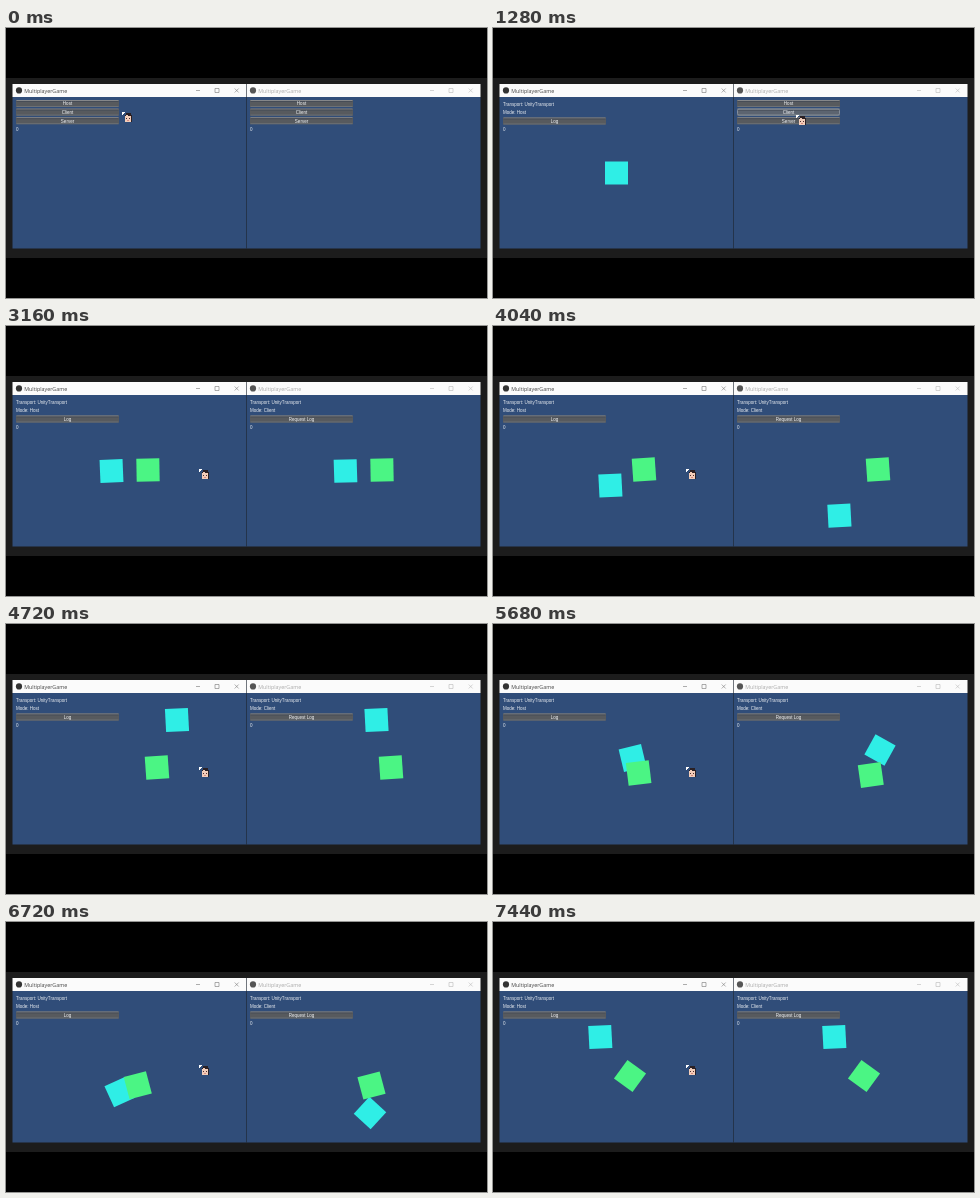
Write an HTML page with a canvas that moves like this. It is 481 by 270 pixels and loops after 7480 ms.

```html
<!DOCTYPE html>
<html lang="en">
<head>
<meta charset="utf-8">
<title>Multiplayer demo</title>
<style>
html, body { margin: 0; width: 100%; height: 100%; overflow: hidden; background: #000; }
canvas { display: block; }
</style>
</head>
<body>
<canvas id="stage" width="481" height="270"></canvas>
<script>
const ctx = document.getElementById('stage').getContext('2d');
const LOOP = 7480, STEP = 40, LAG = 250, GREEN_LAG = 120, SHIFT = 234;
const HOST_AT = 480, FOCUS_RIGHT = 1720, CLIENT_AT = 1900, FOCUS_LEFT = 2880;
const CYAN = '#2feee6', GREEN = '#4bf584', BLUE = '#304d79';

// Waypoints of the steered square: time, x, y
const route = [
  [3260, 105.5, 145], [3500, 128, 145], [3750, 112, 192], [4470, 136.5, 96],
  [4720, 171, 96], [5430, 153, 126], [5680, 139.5, 134], [6080, 163, 162],
  [6470, 130, 191], [6720, 113.7, 170], [7190, 107.3, 115]
];

// Smooth step from 0 to 1 between two times
function ease(t, from, to) {
  const f = Math.min(1, Math.max(0, (t - from) / (to - from)));
  return f * f * (3 - 2 * f);
}

// Cubic Hermite curve through the waypoints, at rest at both ends
function follow(path, t) {
  const last = path.length - 1;
  const time = Math.min(path[last][0], Math.max(path[0][0], t));
  const i = Math.max(1, path.findIndex(p => p[0] >= time));
  const a = path[i - 1], b = path[i], span = b[0] - a[0], f = (time - a[0]) / span;
  const slope = (n, k) => n === 0 || n === last ? 0 :
    (path[n + 1][k] - path[n - 1][k]) / (path[n + 1][0] - path[n - 1][0]);
  return [1, 2].map(k => a[k] + (b[k] - a[k]) * f * f * (3 - 2 * f) +
    span * f * (1 - f) * ((1 - f) * slope(i - 1, k) - f * slope(i, k)));
}

function cyanPose(t) {
  const [x, y] = follow(route, t);
  const angle = -3 * ease(t, CLIENT_AT, 3700) + 32 * ease(t, 5000, 5430) -
    43 * ease(t, 5430, 5680) + 101 * ease(t, 5620, 7190);
  return [x + 18 * (1 - ease(t, CLIENT_AT, 2120)), y, angle];
}

function greenPose(t) {
  const split = ease(t, CLIENT_AT, 2120), push = ease(t, 3300, 3500);
  const drag = ease(t, 4950, 6720), spin = ease(t, 6720, 7200);
  return [
    124 + 18 * split + 9 * push - 19.5 * drag + 5.5 * spin,
    144 - .5 * push + 20 * drag - 9.5 * spin,
    -split - 3 * push - 11 * drag + 51 * spin
  ];
}

function pointerAt(t) {
  const toHost = ease(t, 0, 280), toClient = ease(t, 800, 1280), back = ease(t, 2320, 2800);
  return [
    116 - 12 * toHost + 199 * toClient - 110 * back,
    84 - 7 * toHost + 10 * toClient + 56 * back + 26 * Math.sin(Math.PI * toClient)
  ];
}

function rect(x, y, w, h, color) {
  ctx.fillStyle = color;
  ctx.fillRect(x, y, w, h);
}

function text(str, x, y, color, font = '4.5px "Liberation Sans", sans-serif', align = 'left') {
  ctx.font = font;
  ctx.textAlign = align;
  ctx.fillStyle = color;
  ctx.fillText(str, x, y);
}

function square([x, y, angle], color) {
  ctx.save();
  ctx.translate(x, y);
  ctx.rotate(angle * Math.PI / 180);
  rect(-11.5, -11.5, 23, 23, color);
  ctx.restore();
}

function button(label, y, [px, py]) {
  const hover = px >= 10 && px <= 113 && py >= y && py < y + 8;
  rect(10, y, 103, 7, hover ? '#5c6470' : '#575a5e');
  rect(10.5, y, 102, 1, '#85878a');
  rect(10.5, y + 1, 102, 1, '#464c56');
  rect(10.5, y + 6, 102, 1, '#6d7175');
  if (hover) {
    ctx.strokeStyle = '#8f98a6';
    ctx.lineWidth = .8;
    ctx.beginPath();
    ctx.roundRect(10.5, y + .5, 102, 6, 1.5);
    ctx.stroke();
  }
  text(label, 61.5, y + 5.4, '#f2f4f6', undefined, 'center');
}

function titleBar(active) {
  rect(6.5, 56, 234, 13, '#fbfbfb');
  ctx.fillStyle = active ? '#333' : '#555';
  ctx.beginPath();
  ctx.arc(13, 62.4, 3.1, 0, 7);
  ctx.fill();
  text('MultiplayerGame', 18.2, 64.6, active ? '#444' : '#aaa', '5.35px "Open Sans", sans-serif');
  ctx.strokeStyle = active ? '#777' : '#bbb';
  ctx.lineWidth = .6;
  ctx.beginPath();
  ctx.moveTo(190, 62.5); ctx.lineTo(194, 62.5);
  ctx.rect(209, 60.5, 4, 4);
  ctx.moveTo(228.7, 60.5); ctx.lineTo(232.7, 64.5);
  ctx.moveTo(232.7, 60.5); ctx.lineTo(228.7, 64.5);
  ctx.stroke();
}

function gameWindow(dx, active, mode, action, pointer, squares) {
  ctx.save();
  ctx.translate(dx, 0);
  titleBar(active);
  rect(6.5, 69, 234, 151.5, BLUE);
  if (mode) {
    text('Transport: UnityTransport', 10, 77.6, '#eceff3');
    text('Mode: ' + mode, 10, 86.1, '#eceff3');
    button(action, 89.5, pointer);
    squares.forEach(s => square(...s));
  } else {
    ['Host', 'Client', 'Server'].forEach((s, i) => button(s, 72 + i * 8.6, pointer));
  }
  text('0', 10, 103, '#eceff3');
  ctx.restore();
}

// Small arrow with a little face hanging below it
function cursor([x, y]) {
  ctx.save();
  ctx.translate(Math.round(x), Math.round(y));
  for (let i = 0; i < 3; i++) rect(0, i, 3 - i, 1, '#fff');
  rect(4, 1, 5, 2, '#2a2024');
  rect(3, 3, 7, 7, '#2a2024');
  rect(3, 4, 6, 6, '#f3cdb9');
  rect(4, 3, 2, 1, '#f3cdb9');
  rect(4, 6, 1, 1, '#4a2c30');
  rect(7, 6, 1, 1, '#4a2c30');
  rect(5, 8, 2, 1, '#d98c82');
  ctx.restore();
}

function draw(t) {
  const pointer = pointerAt(t), [px, py] = pointer;
  const joined = t >= CLIENT_AT;
  const rightActive = t >= FOCUS_RIGHT && t < FOCUS_LEFT;
  const left = [[cyanPose(t), CYAN]];
  if (joined) left.push([greenPose(t - GREEN_LAG), GREEN]);
  const right = [[cyanPose(t - LAG), CYAN], [greenPose(t), GREEN]];

  rect(0, 0, 481, 270, '#000');
  rect(0, 50, 481, 180, '#1c1c1c');
  gameWindow(0, !rightActive, t >= HOST_AT && 'Host', 'Log', pointer, left);
  gameWindow(SHIFT, rightActive, joined && 'Client', 'Request Log', [px - SHIFT, py], right);
  rect(240, 56, 1, 164.5, 'rgba(30, 40, 55, .5)');
  cursor(pointer);
}

const start = performance.now();
function frame(now) {
  const t = Math.max(0, now - start) % LOOP;
  draw(Math.floor(t / STEP) * STEP);
  requestAnimationFrame(frame);
}
draw(0);
requestAnimationFrame(frame);
</script>
</body>
</html>
```
